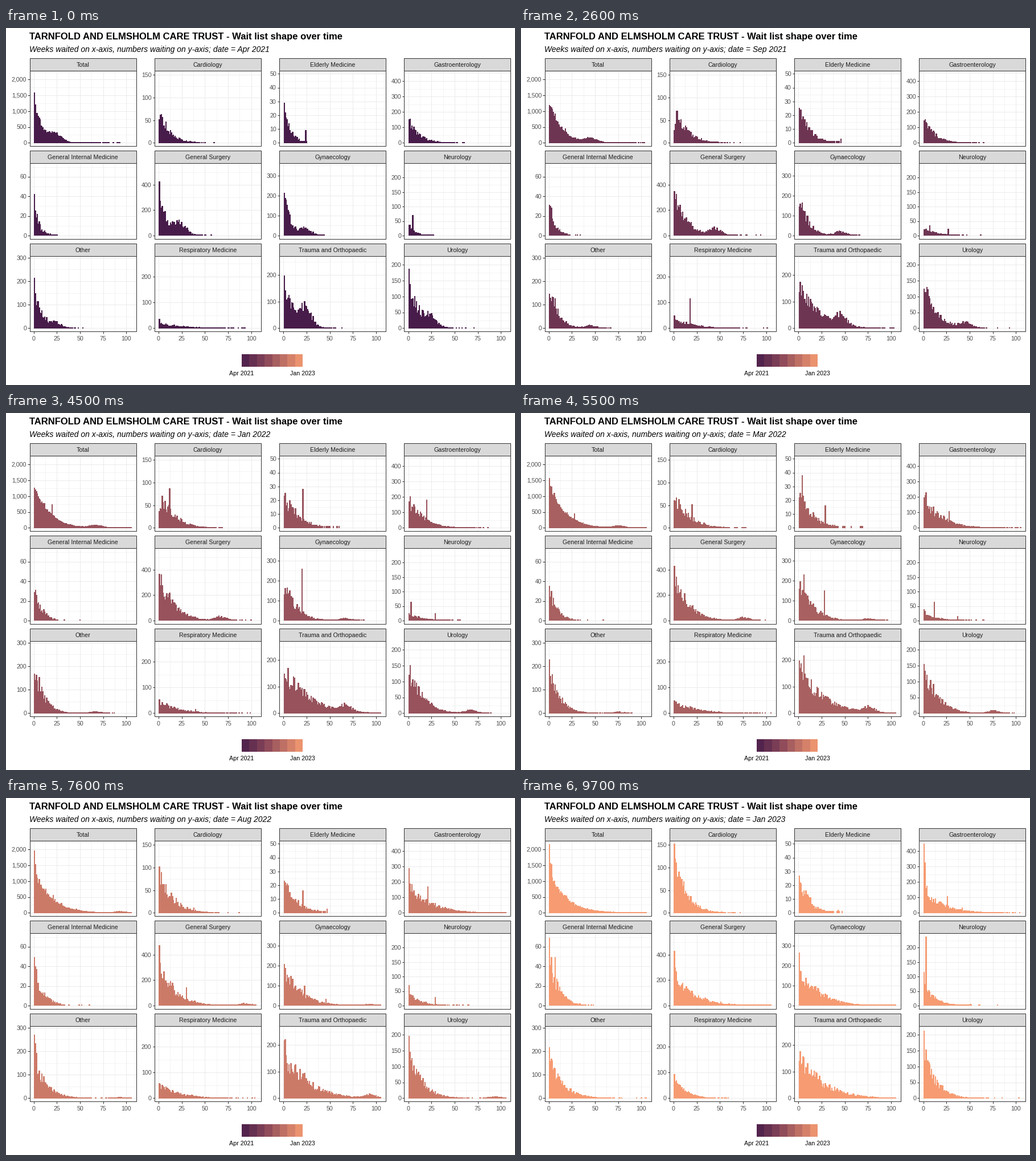
A matplotlib script for the animation above (10 s loop, 894x626 px).

```python
import numpy as np
import matplotlib
import matplotlib.pyplot as plt
from matplotlib.animation import FuncAnimation
from matplotlib.collections import LineCollection
from matplotlib.patches import Rectangle

W, H, DPI = 894, 626, 64
PX = 72 / DPI                      # points per pixel
matplotlib.rcParams["font.family"] = "Liberation Sans"

WEEKS = np.arange(1, 106)
KEYS = [0, 8, 14, 21]              # months at which the curves are pinned
MONTHS = [m for m in range(22) if m != 6]
STARTS = np.array(list(range(5, 81, 5)) + [84, 88, 92, 96])
NAMES = "Jan Feb Mar Apr May Jun Jul Aug Sep Oct Nov Dec".split()
AGEING = 4.345                     # weeks per month
PANELS = []


def panel(name, step, top, unit, first=None, body=None, length=None, hump=0, spikes=()):
    """Tick step, last tick and pixels per unit; then, at each key month, the
    newest bar, the height of the body and the weeks it takes to fade.
    Spikes are (month, week, size)."""
    PANELS.append((name, step, top, unit, first, body, length, hump, spikes))


panel("Total", 500, 2000, 0.05565)
panel("Cardiology", 50, 150, 0.794,
      [51, 15, 82, 152], [58, 75, 60, 100], [13, 16, 18, 15], spikes=[(8, 3, 117)])
panel("Elderly Medicine", 10, 50, 2.42,
      [29, 24, 21, 27], [20, 20, 22, 20], [8, 17, 15, 13],
      spikes=[(0, 24, 9), (8, 12, 37), (12, 4, 38)])
panel("Gastroenterology", 100, 400, 0.271,
      [152, 140, 225, 447], [115, 160, 160, 125], [13, 12, 26, 23],
      spikes=[(8, 11, 245), (14, 12, 230), (18, 13, 185)])
panel("General Internal Medicine", 20, 60, 1.72,
      [42, 23, 41, 69], [22, 28, 24, 38], [7, 8, 11, 12], spikes=[(21, 7, 49)])
panel("General Surgery", 200, 400, 0.2225,
      [425, 300, 490, 428], [270, 290, 300, 200], [10, 18, 17, 24], 80,
      [(14, 21, 190)])
panel("Gynaecology", 100, 300, 0.35,
      [213, 103, 185, 264], [190, 175, 150, 150], [7, 12, 19, 24], 32,
      [(8, 11, 345), (12, 6, 230)])
panel("Neurology", 50, 200, 0.508,
      [37, 10, 52, 114], [26, 16, 25, 55], [8, 18, 14, 14],
      spikes=[(0, 5, 70), (8, 20, 34), (12, 12, 64), (21, 3, 237)])
panel("Other", 100, 300, 0.4117,
      [214, 105, 292, 216], [145, 185, 135, 135], [9, 11, 14, 17], 18)
panel("Respiratory Medicine", 100, 200, 0.4525,
      [36, 55, 45, 92], [16, 38, 38, 60], [28, 20, 28, 14], spikes=[(1, 1, 267)])
panel("Trauma and Orthopaedic", 100, 200, 0.467,
      [197, 97, 247, 140], [135, 140, 150, 140], [13, 29, 27, 28], 60,
      [(12, 6, 215)])
panel("Urology", 50, 200, 0.555,
      [187, 85, 190, 213], [130, 120, 125, 125], [12, 17, 16, 15], 25)


def counts(first, body, length, hump, spikes, month, noise, dither):
    """Bar heights; the roughness ages with the patients, week by week."""
    f, b, n = (np.interp(month, KEYS, v) for v in (first, body, length))
    age = WEEKS - 1
    curve = b * np.exp(-(age / n) ** 1.2) + (f - b) * np.exp(-age / 1.2)
    centre = 24 + AGEING * month
    curve += hump * 0.9 ** month * np.exp(-((WEEKS - centre) / 9) ** 2)
    cohort = WEEKS - round(AGEING * month) + 100
    curve[1:] *= 1 + 0.3 * noise[cohort[1:]]
    bars = np.floor(curve + dither[cohort])
    for m, week, size in spikes:
        w = round(week + AGEING * (month - m))
        if 1 <= w <= 105:
            fade = np.exp(-(max(month - m, 0) / 4.5) ** 1.5)
            bars[w - 1] = max(bars[w - 1], round(size * fade))
    return bars


def build_states():
    rng = np.random.default_rng(11)
    rough = [(rng.uniform(-1, 1, 220), rng.uniform(0, 1, 220)) for _ in PANELS[1:]]
    states = []
    for month in MONTHS:
        parts = [counts(*p[4:], month, *r) for p, r in zip(PANELS[1:], rough)]
        states.append([np.sum(parts, axis=0)] + parts)
    return states


def ramp(t):
    stops = [0, 0.38, 0.57, 0.86, 1]
    rgb = [(72, 28, 74), (133, 68, 88), (168, 96, 96), (222, 136, 108), (246, 155, 114)]
    return tuple(np.interp(t, stops, c) / 255 for c in zip(*rgb))


fig = plt.figure(figsize=(W / DPI, H / DPI), dpi=DPI, facecolor="white")
ax = fig.add_axes([0, 0, 1, 1])
ax.set_xlim(0, W)
ax.set_ylim(H, 0)
ax.axis("off")


def text(x, y, s, size=10.6, color="black", ha="center", **kw):
    return ax.text(x, y, s, fontsize=size * PX, color=color, ha=ha, va="baseline", **kw)


def line(xs, ys, color, width=1.0, z=1):
    ax.plot(xs, ys, color=color, lw=width * PX, zorder=z, solid_capstyle="butt")


def box(x0, y0, x1, y1, face, z, edge="#333333"):
    ax.add_patch(Rectangle((x0, y0), x1 - x0, y1 - y0, fc=face, ec=edge,
                           lw=PX if edge != "none" else 0, zorder=z))


PANEL_W, WEEK_PX = 187, 1.628


def origin(i):
    """Pixel position of week 0, count 0."""
    return 48.6 + 219.33 * (i % 4), 201.4 + 162.5 * (i // 4)


def draw_panel(i, name, step, top, unit):
    zx, zy = origin(i)
    left, bottom, head = zx - 7.1, zy + 6, zy - 126.8
    right = left + PANEL_W
    for week in np.arange(0, 101, 12.5):
        x = zx + week * WEEK_PX
        major = week % 25 == 0
        line([x, x], [head, bottom], "#EBEBEB", 1.0 if major else 0.5)
        if major and i >= 8:
            line([x, x], [bottom, bottom + 3.3], "#333333")
            text(x, 547.8, f"{week:.0f}", color="#4D4D4D")
    for k in range(2 * top // step + 2):
        y = zy - k * step / 2 * unit
        if y < head:
            break
        major = k % 2 == 0
        line([left, right], [y, y], "#EBEBEB", 1.0 if major else 0.5)
        if major:
            line([left - 3.3, left], [y, y], "#333333")
            text(left - 5.3, y + 3.8, f"{k * step // 2:,}", color="#4D4D4D", ha="right")
    box(left, head, right, bottom, "none", 4)
    box(left, head - 22, right, head, "#D9D9D9", 4)
    text((left + right) / 2, head - 6.9, name, color="#1A1A1A", zorder=5)


for i, p in enumerate(PANELS):
    draw_panel(i, *p[:4])

text(41, 20, "TARNFOLD AND ELMSHOLM CARE TRUST - Wait list shape over time",
     16.65, ha="left", weight="bold")
subtitle = text(41, 42, "", 13.9, ha="left", style="italic")

BIN = 107 / 8
for b in range(8):
    box(414 + b * BIN, 572.3, 414 + (b + 1) * BIN, 593.7, ramp((b + 0.5) / 8), 2, "none")
text(414, 609, "Apr 2021")
text(521, 609, "Jan 2023")

bars = LineCollection([], linewidths=0.9 * WEEK_PX * PX, capstyle="butt",
                      antialiaseds=False, snap=False, zorder=3)
ax.add_collection(bars, autolim=False)


def segments(state):
    out = []
    for i, (p, heights) in enumerate(zip(PANELS, state)):
        zx, zy = origin(i)
        for week, n in zip(WEEKS, heights):
            if n > 0:
                x = zx + week * WEEK_PX
                out.append([(x, zy), (x, zy - max(n * p[3], 1))])
    return out


SEGMENTS = [segments(s) for s in build_states()]


def update(i):
    # bars move on one step before the date does
    now = int(np.sum(STARTS <= i))
    dated = MONTHS[int(np.sum(STARTS < i))] + 3
    bars.set_segments(SEGMENTS[now])
    bars.set_color(ramp(MONTHS[now] / 21))
    subtitle.set_text("Weeks waited on x-axis, numbers waiting on y-axis; date = "
                      f"{NAMES[dated % 12]} {2021 + dated // 12}")
    return bars, subtitle


anim = FuncAnimation(fig, update, frames=100, interval=100, repeat=True,
                     repeat_delay=0, blit=False)
plt.show()
```
